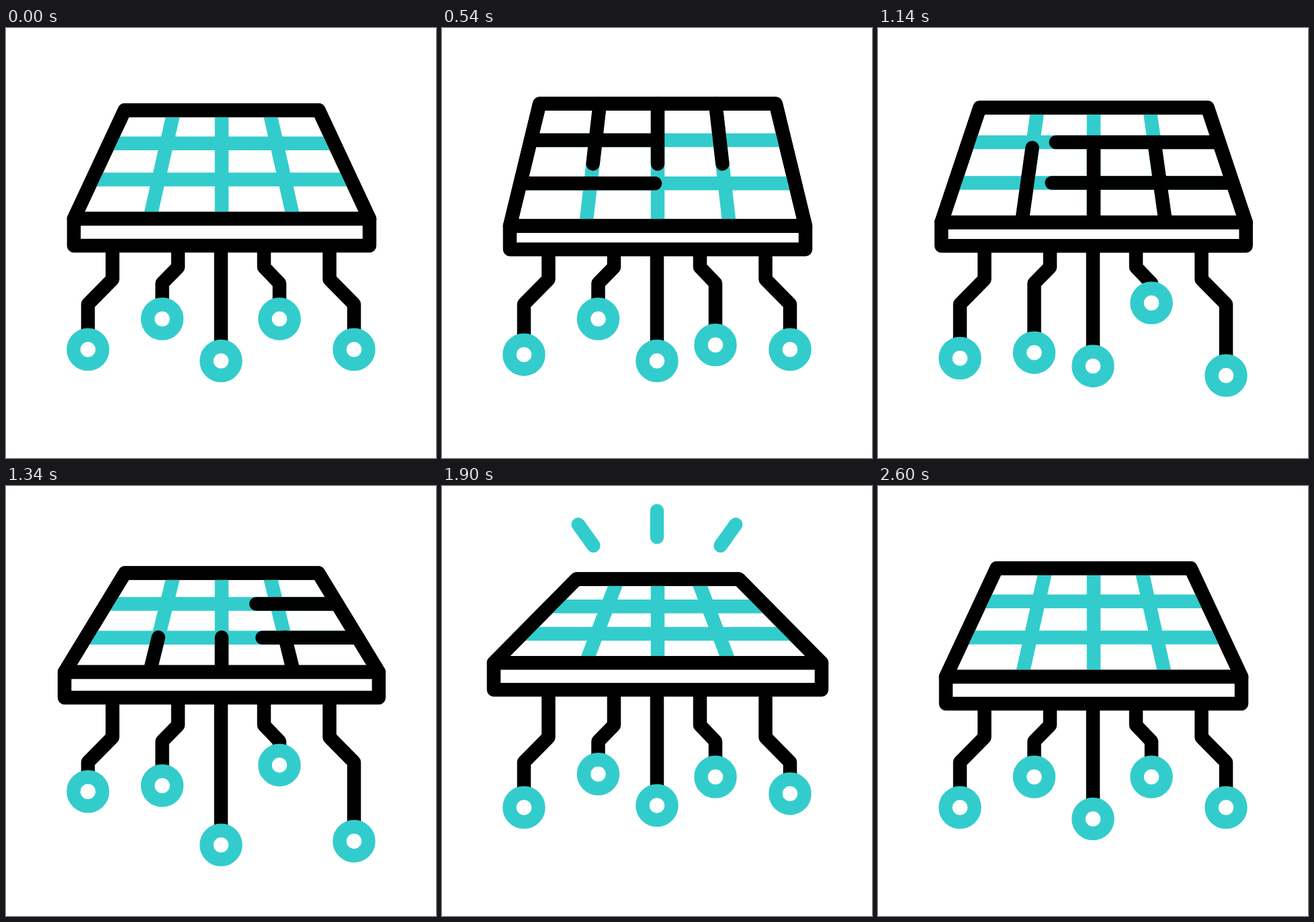
Animation of 640x640 px, one loop 3000 ms. Source, as an HTML page with a canvas:

```html
<!DOCTYPE html>
<html lang="en">
<head>
<meta charset="utf-8">
<title>Solar panel</title>
<style>
  html, body { margin: 0; width: 100%; height: 100%; overflow: hidden; background: #fff; }
  canvas { display: block; width: 640px; height: 640px; }
</style>
</head>
<body>
<canvas id="stage" width="640" height="640"></canvas>
<script>
const ctx = document.getElementById('stage').getContext('2d');
const LOOP = 3000, LINE = 20.5, MID = 321;
const BLACK = '#000', TEAL = '#33cccc';

const clamp = p => Math.min(1, Math.max(0, p));
const lerp = (a, b, p) => a + (b - a) * p;
const smooth = p => (1 - Math.cos(Math.PI * p)) / 2;
const easeOut = p => 1 - Math.pow(1 - p, 1.2);
const span = (t, from, to) => clamp((t - from) / (to - from));

// Eased value from a list of [time, value] steps.
function track(t, steps) {
  let v = steps[0][1];
  for (let i = 1; i < steps.length; i++) {
    const [t0] = steps[i - 1], [t1, v1] = steps[i];
    if (t > t0) v = lerp(steps[i - 1][1], v1, smooth(span(t, t0, t1)));
  }
  return v;
}

// Panel part: opens, tilts flat by `end`, then returns.
const tilt = (t, rest, open, flat, end) =>
  track(t, [[220, rest], [780, open], [end, flat], [2100, flat], [2600, rest]]);

// Legs: start x, bend y, ring x, second bend y, ring rest y, delay step.
const LEGS = [
  [158.5, 374, 122, 411, 478.5, 1],
  [256, 356, 232.5, 380, 433, 2],
  [320, 360, 320, 380, 495.5, 4],
  [384, 356, 407, 380, 433, 0],
  [481.5, 374, 518, 411, 478.5, 3]
];

// Rays: foot x, foot y, direction.
const RAYS = [[237, 105, -0.58, -0.81], [320, 96, 0, -1], [403, 105, 0.58, -0.81]];
const RAY_LENGTH = 64;

function stroke(points, color, cap = 'butt', close = false) {
  ctx.beginPath();
  points.forEach(([x, y]) => ctx.lineTo(x, y));
  if (close) {
    ctx.closePath();
    ctx.fillStyle = '#fff';
    ctx.fill();
  }
  ctx.strokeStyle = color;
  ctx.lineCap = cap;
  ctx.stroke();
}

// Part of a straight line between the fractions a and b.
function trim([x0, y0], [x1, y1], a, b, color) {
  if (b <= a) return;
  const at = p => [lerp(x0, x1, p), lerp(y0, y1, p)];
  stroke([at(a), at(b)], color, 'round');
}

function drawLeg(t, [x0, y0, x1, y1, rest, step]) {
  const s = 220 + 200 * step;
  const y = rest + track(t, [[s, 0], [s + 480, 51.5], [s + 960, -25], [s + 1400, 0]]);
  stroke([[x0, 296], [x0, y0], [x1, y1], [x1, Math.max(y1 + 1, y - 21)]], BLACK);
  ctx.beginPath();
  ctx.arc(x1, y, 21.5, 0, 2 * Math.PI);
  ctx.fillStyle = '#fff';
  ctx.fill();
  ctx.strokeStyle = TEAL;
  ctx.stroke();
}

function drawPanel(t) {
  const top = tilt(t, 122.5, 106.8, 138.4, 1650);
  const front = tilt(t, 284, 301.7, 263.3, 1728);
  const base = tilt(t, 324, 333, 303.3, 1765);
  const back = tilt(t, 144.5, 195.5, 120.7, 1680);
  const wide = tilt(t, 220, 220, 244, 1800);
  const row1 = top + 12 + 0.231 * (front - top);
  const row2 = tilt(t, 225.5, 235, 220, 1760);

  const row = y => {
    const half = lerp(back, wide, (y - top) / (front - top));
    return [[MID - half, y], [MID + half, y]];
  };
  const col = side => [[MID + side * back * 0.49, top], [MID + side * 107, front]];
  const lines = [col(-1), col(0), col(1), row(row1), row(row2)];

  const corners = [[MID - back, top], [MID + back, top], [MID + wide, front], [MID - wide, front]];
  const box = [[MID - wide, front], [MID + wide, front], [MID + wide, base], [MID - wide, base]];
  stroke(corners, BLACK, 'butt', true);
  lines.forEach(l => stroke(l, TEAL));

  const head = easeOut(span(t, 234, 948)), tail = easeOut(span(t, 927, 1638));
  lines.forEach(([a, b]) => trim(a, b, tail, head, BLACK));
  stroke([...corners, corners[0], corners[1]], BLACK);
  stroke(box, BLACK, 'butt', true);
}

function drawRays(t) {
  const head = smooth(span(t, 1502, 1990)), tail = smooth(span(t, 1720, 2200));
  for (const [x, y, dx, dy] of RAYS) {
    trim([x, y], [x + dx * RAY_LENGTH, y + dy * RAY_LENGTH], tail, head, TEAL);
  }
}

function draw(t) {
  ctx.fillStyle = '#fff';
  ctx.fillRect(0, 0, 640, 640);
  ctx.lineWidth = LINE;
  ctx.lineJoin = 'round';
  LEGS.forEach(leg => drawLeg(t, leg));
  drawPanel(t);
  drawRays(t);
}

const begin = performance.now();
function tick() {
  draw((performance.now() - begin) % LOOP);
  requestAnimationFrame(tick);
}
tick();
</script>
</body>
</html>
```
